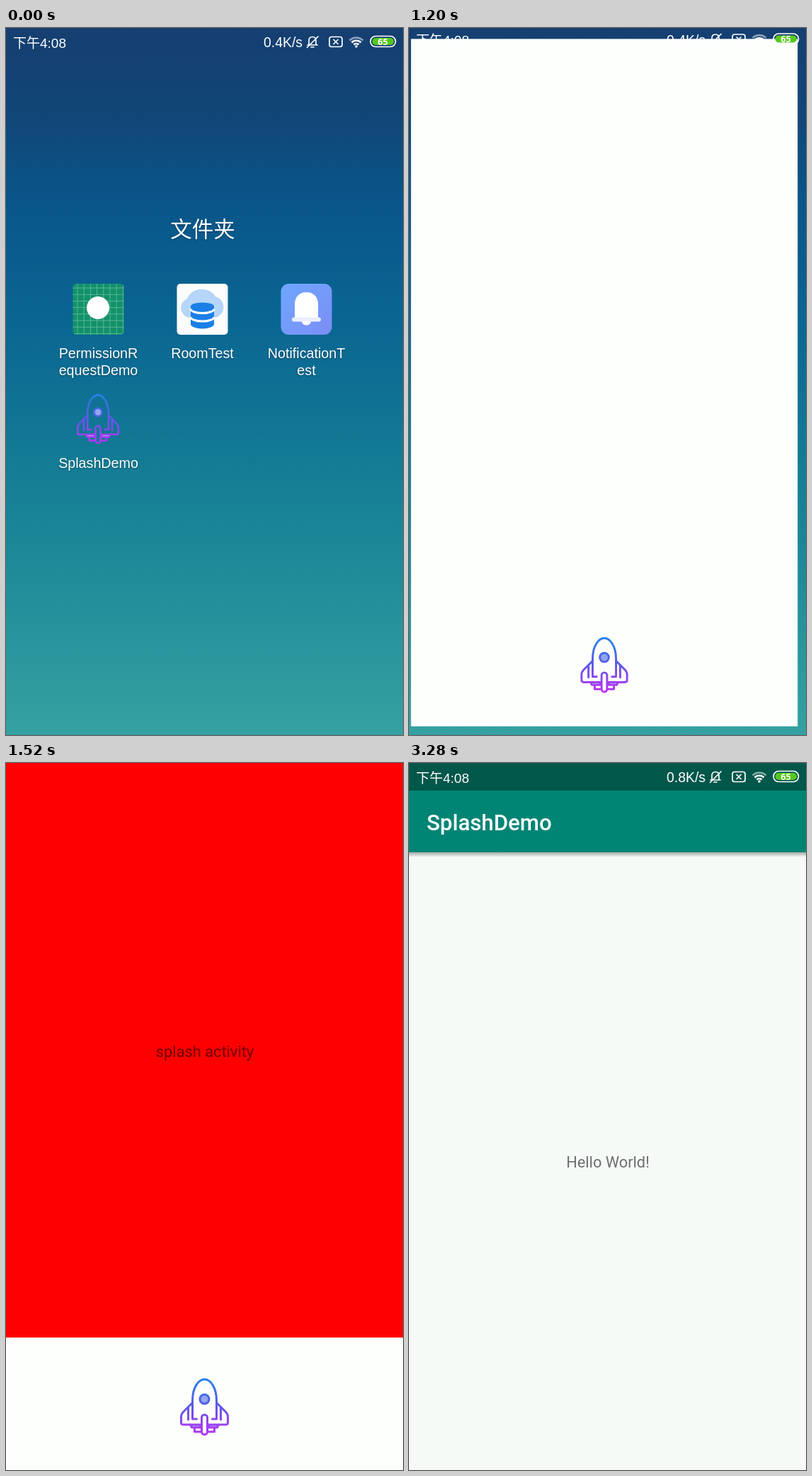
These frames come from a looping animation (561 by 998 pixels, 4 s). An HTML page:

```html
<!DOCTYPE html>
<html lang="zh">
<head>
<meta charset="utf-8">
<title>SplashDemo</title>
<style>
html, body { margin: 0; width: 100%; height: 100%; overflow: hidden; background: #0b6490; }
svg { display: block; width: 100vw; height: 100vh; }
text { font-family: Roboto, sans-serif; font-size: 21.8px; }
.mid { text-anchor: middle; }
.labels text { font: 19.7px "Liberation Sans", sans-serif; fill: #fff; text-anchor: middle; }
.labels, .heading { filter: drop-shadow(0 1px 1px rgba(0, 0, 0, .35)); }
.heading { font: 30.5px "Noto Sans CJK SC", "Noto Sans CJK", sans-serif; fill: #fff; }
#status text { font: 19.4px "Liberation Sans", "Noto Sans CJK SC", "Noto Sans CJK", sans-serif; fill: #fff; }
#status text.cjk { font-size: 19px; }
#status text.level { font: bold 12.5px "Open Sans", sans-serif; }
.line { fill: none; stroke: #fff; stroke-width: 1.7; stroke-linecap: round; stroke-linejoin: round; }
</style>
</head>
<body>
<svg viewBox="0 0 561 998" preserveAspectRatio="none">
  <defs>
    <linearGradient id="wallpaper" x2="0" y2="1">
      <stop offset="0" stop-color="#153f70"/>
      <stop offset=".12" stop-color="#114677"/>
      <stop offset=".25" stop-color="#09568a"/>
      <stop offset=".42" stop-color="#0a6692"/>
      <stop offset=".62" stop-color="#147c95"/>
      <stop offset=".8" stop-color="#228e9a"/>
      <stop offset="1" stop-color="#36a1a1"/>
    </linearGradient>
    <linearGradient id="rocketInk" gradientUnits="userSpaceOnUse" x1="0" y1="-40" x2="0" y2="40">
      <stop offset="0" stop-color="#2482ea"/>
      <stop offset=".5" stop-color="#5f58e6"/>
      <stop offset=".8" stop-color="#9a42f2"/>
      <stop offset="1" stop-color="#b832f0"/>
    </linearGradient>
    <linearGradient id="bellTile" x2="1" y2="1">
      <stop offset="0" stop-color="#6ea8ff"/>
      <stop offset="1" stop-color="#7c8df4"/>
    </linearGradient>
    <linearGradient id="barShadow" x2="0" y2="1">
      <stop offset="0" stop-color="#000" stop-opacity=".32"/>
      <stop offset="1" stop-color="#000" stop-opacity="0"/>
    </linearGradient>
    <pattern id="grid" width="9.2" height="9.2" patternUnits="userSpaceOnUse" x="95" y="361">
      <path d="M6 0V9.2M0 6H9.2" stroke="#5fb998" stroke-width=".9"/>
    </pattern>
    <g id="rocket" fill="none" stroke="url(#rocketInk)" stroke-width="3" stroke-linecap="round" stroke-linejoin="round">
      <path d="M-20 25H-6V29H-18ZM20 25H6V29H18Z" fill="#b9a4f6"/>
      <path d="M-11 17H-17V-9C-17-28-8-39 0-39S17-28 17-9V17H11"/>
      <circle cy="-11" r="6.5" fill="#93a6ee"/>
      <path d="M-17-6L-30 7Q-33 10-33 14V22Q-33 25-30 25H-20M17-6L30 7Q33 10 33 14V22Q33 25 30 25H20"/>
      <path d="M-23 1V18M23 1V18M-14 31V35H-5M14 31V35H5"/>
      <rect x="-4" y="11" width="8" height="28" rx="4"/>
    </g>
  </defs>

  <g id="home">
    <rect width="561" height="998" fill="url(#wallpaper)"/>
    <text class="heading mid" x="278" y="295">文件夹</text>
    <rect x="94.5" y="361" width="72" height="72" rx="5" fill="#12916b"/>
    <rect x="94.5" y="361" width="72" height="72" rx="5" fill="url(#grid)"/>
    <circle cx="130" cy="395" r="16" fill="#fff"/>
    <g>
      <rect x="241.5" y="361" width="72" height="72" rx="5" fill="#fcfdfc"/>
      <path d="M260 409A14 14 0 0 1 256 382A22 20 0 0 1 296 379A16 15.500 0 0 1 295 409Z" fill="#b5d6f8"/>
      <path d="M261 393V418A16.500 6.500 0 0 0 294 418V393A16.500 5.500 0 0 0 261 393Z" fill="#1b7fe6"/>
      <path d="M261 396.500A16.500 6 0 0 0 294 396.500M261 408A16.500 6 0 0 0 294 408" fill="none" stroke="#fff" stroke-width="3"/>
    </g>
    <g>
      <rect x="388.500" y="361" width="72" height="72" rx="11" fill="url(#bellTile)"/>
      <path d="M408 410V390C408 379 415 373 424.500 373S441 379 441 390V410Z" fill="#fff"/>
      <rect x="404" y="408.500" width="41" height="6" rx="3" fill="#e9efff"/>
      <path d="M418 414H431A6.500 5.500 0 0 1 418 414Z" fill="#fff"/>
    </g>
    <use href="#rocket" transform="translate(130 552) scale(.87)"/>
    <g class="labels">
      <text x="130.500" y="466">PermissionR</text>
      <text x="130.500" y="490">equestDemo</text>
      <text x="277.500" y="466">RoomTest</text>
      <text x="424.500" y="466">NotificationT</text>
      <text x="424.500" y="490">est</text>
      <text x="130.500" y="621">SplashDemo</text>
    </g>
  </g>

  <g id="splash">
    <rect width="561" height="998" fill="#fdfffd"/>
    <g id="redPanel">
      <rect width="561" height="811" fill="#f00"/>
      <text class="mid" x="281" y="414.500" fill-opacity=".56">splash activity</text>
    </g>
    <use href="#rocket" x="280.500" y="909"/>
    <rect id="dim" width="561" height="998" opacity="0"/>
  </g>

  <g id="main">
    <rect width="561" height="998" fill="#f5faf7"/>
    <g id="appBar">
      <rect y="126" width="561" height="7" fill="url(#barShadow)"/>
      <rect width="561" height="39.500" fill="#00574a"/>
      <rect y="39" width="561" height="87" fill="#008575"/>
      <text x="25" y="95" fill="#fff" style="font-size:31.2px;font-weight:500">SplashDemo</text>
    </g>
    <text id="hello" class="mid" x="281" y="571" fill="#6c706e">Hello World!</text>
  </g>

  <g id="status">
    <text class="cjk" x="10" y="27.500">下午4:08</text>
    <text id="speed" x="364" y="27"></text>
    <path class="line" d="M426 24H440M428 24V18C428 14.500 430 12.500 433 12.500S438 14.500 438 18V24M431 27H435M425.500 27.500L441 12"/>
    <rect class="line" x="457" y="12.500" width="18" height="14" rx="3"/>
    <path class="line" d="M463 16.500L469 22.500M469 16.500L463 22.500"/>
    <g class="line" style="stroke-width:2.600;stroke-linecap:butt">
      <path d="M485.500 17.500A13.500 13.500 0 0 1 504.500 17.500" opacity=".5"/>
      <path d="M488.500 20.500A9 9 0 0 1 501.500 20.500"/>
      <path d="M491.500 23.500A5 5 0 0 1 498.500 23.500"/>
    </g>
    <circle cx="495" cy="26" r="1.800" fill="#fff"/>
    <rect class="line" x="515" y="11.500" width="35.500" height="15" rx="7.500"/>
    <rect x="517.500" y="14" width="30.500" height="10" rx="5" fill="#55c81c"/>
    <text class="level mid" x="532.500" y="23.500">65</text>
  </g>
</svg>
<script>
const LOOP = 4000, STEP = 80, W = 561, H = 998;
const ICON = { left: 94, top: 516, right: 166, bottom: 588 };
const el = Object.fromEntries([...document.querySelectorAll('[id]')].map(n => [n.id, n]));

const progress = (t, start, length) => Math.min(1, Math.max(0, (t - start) / length));
const easeOut = (u, power) => 1 - (1 - u) ** power;
const show = (node, on) => node.setAttribute('display', on ? 'inline' : 'none');
const place = (node, x, y, more = '') => node.setAttribute('transform', `translate(${x} ${y}) ${more}`);

function drawSplash(t, slide) {
  const open = easeOut(progress(t, 1000, 290), 3), rest = 1 - open;
  const left = ICON.left * rest, top = ICON.top * rest;
  const width = W - (W - ICON.right) * rest - left;
  const height = H - (H - ICON.bottom) * rest - top;
  place(el.splash, left - slide * W * .221, top, `scale(${width / W} ${height / H})`);
  el.splash.setAttribute('opacity', Math.min(1, open * 2));
  el.redPanel.setAttribute('opacity', easeOut(progress(t, 1220, 220), 2));
  el.dim.setAttribute('opacity', .383 * slide);
}

function drawMain(slide, t) {
  const inset = t < 3040 ? 39 : 0; // the status bar inset arrives during the slide
  place(el.main, W * (1 - slide), 0);
  place(el.appBar, 0, -inset);
  place(el.hello, 0, -inset / 2);
}

function statusOffset(t) {
  if (t < 2960) return -45 * progress(t, 1193, 90);
  return -15 * (1 - progress(t, 2960, 80));
}

function draw(t) {
  const slide = t < 2960 ? 0 : easeOut(progress(t, 2900, 340), 4);
  show(el.home, t < 1360);
  show(el.splash, t > 1000 && slide < 1);
  show(el.main, slide > 0);
  show(el.status, t < 1360 || t >= 2960);
  el.speed.textContent = t < 2960 ? '0.4K/s' : '0.8K/s';
  place(el.status, 0, statusOffset(t));
  drawSplash(t, slide);
  drawMain(slide, t);
}

const origin = performance.now();
function tick() {
  const t = (performance.now() - origin) % LOOP;
  draw(Math.floor(t / STEP) * STEP);
  requestAnimationFrame(tick);
}
tick();
</script>
</body>
</html>
```
